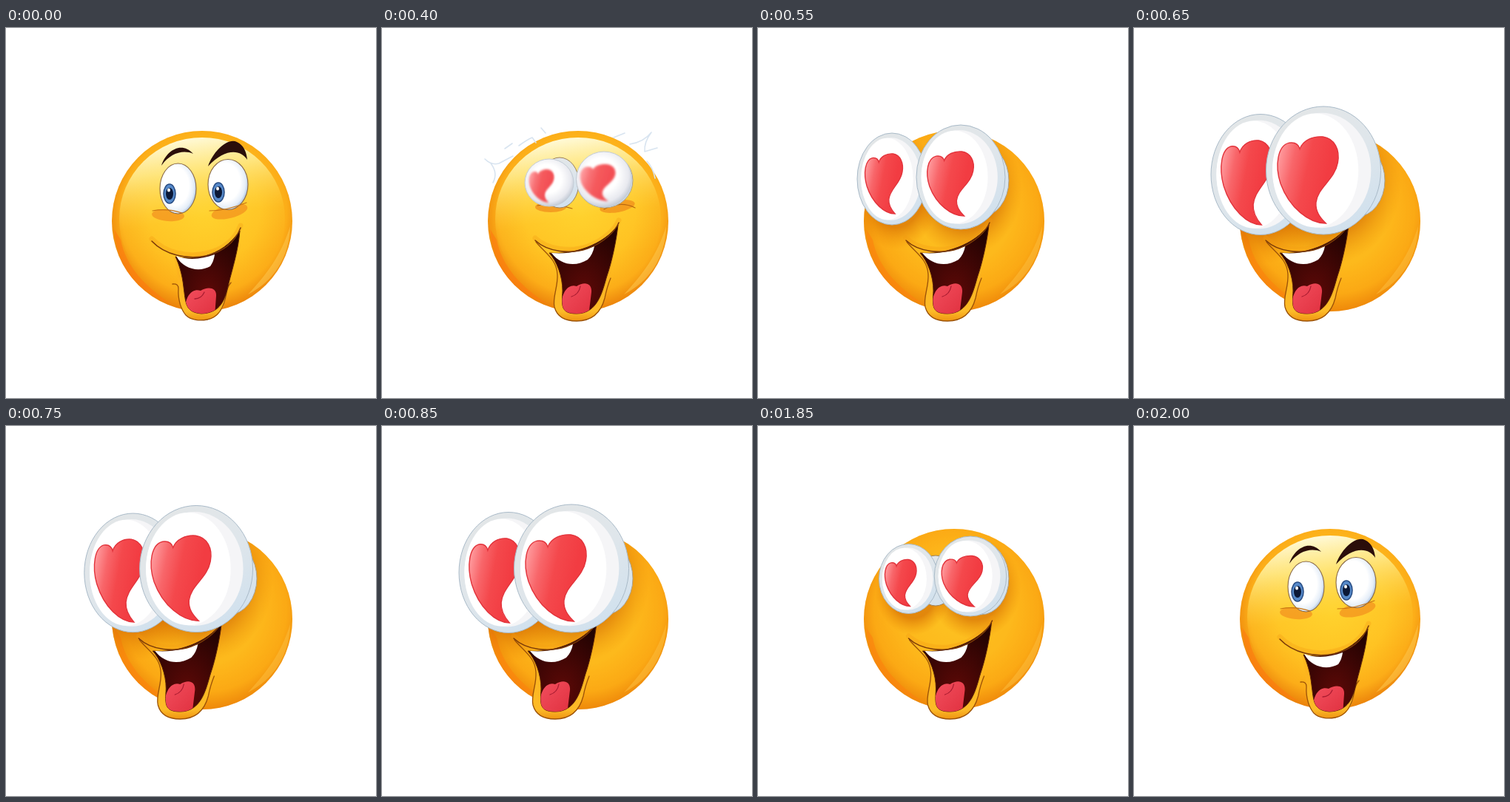
Animation, 500 px wide and 500 px high, one loop 2.2 s. Source, as an HTML page:

```html
<!DOCTYPE html>
<html lang="en">
<head>
<meta charset="utf-8">
<title>Heart eyes</title>
<style>
  html, body { margin: 0; width: 100%; height: 100%; overflow: hidden; background: #fff; }
  svg { display: block; width: 100vw; height: 100vh; }
  .line { fill: none; stroke-linecap: round; stroke-linejoin: round; }
</style>
</head>
<body>
<svg viewBox="0 0 500 500">
  <defs>
    <radialGradient id="skin" gradientUnits="userSpaceOnUse" cx="268" cy="248" r="136">
      <stop offset="0" stop-color="#ffd02a"/><stop offset=".55" stop-color="#ffc222"/>
      <stop offset=".82" stop-color="#fcad18"/><stop offset="1" stop-color="#ea800a"/>
    </radialGradient>
    <linearGradient id="shine" x1=".4" y1="0" x2=".55" y2="1">
      <stop offset="0" stop-color="#fffbdc"/><stop offset=".2" stop-color="#ffec8c" stop-opacity=".85"/>
      <stop offset=".5" stop-color="#ffda3c" stop-opacity=".2"/><stop offset=".75" stop-color="#ffd030" stop-opacity="0"/>
    </linearGradient>
    <linearGradient id="chin" x1="0" y1="0" x2="0" y2="1">
      <stop offset="0" stop-color="#fdb41e" stop-opacity="0"/><stop offset=".45" stop-color="#fdb41e"/>
      <stop offset=".88" stop-color="#fdbb28"/><stop offset="1" stop-color="#ee9412"/>
    </linearGradient>
    <radialGradient id="shadow">
      <stop offset=".62" stop-color="#d06400" stop-opacity=".6"/><stop offset="1" stop-color="#e88000" stop-opacity="0"/>
    </radialGradient>
    <radialGradient id="white" cx=".42" cy=".45" r=".58">
      <stop offset=".65" stop-color="#fff"/><stop offset=".9" stop-color="#e4edf8"/><stop offset="1" stop-color="#b4c9e4"/>
    </radialGradient>
    <radialGradient id="ball" cx=".45" cy=".42" r=".6">
      <stop offset=".5" stop-color="#fff"/><stop offset=".82" stop-color="#e8e9ef"/><stop offset="1" stop-color="#bfc7d2"/>
    </radialGradient>
    <linearGradient id="rim" x1=".2" y1="0" x2=".8" y2="1">
      <stop offset="0" stop-color="#e3e6e7"/><stop offset=".5" stop-color="#dfe6eb"/><stop offset="1" stop-color="#cfe0ee"/>
    </linearGradient>
    <linearGradient id="heart" x1="0" y1=".25" x2=".8" y2=".5">
      <stop offset="0" stop-color="#ff9da0"/><stop offset=".3" stop-color="#f8666a"/>
      <stop offset=".6" stop-color="#f4484c"/><stop offset="1" stop-color="#f23c42"/>
    </linearGradient>
    <radialGradient id="mouth" cx=".5" cy=".75" r=".75">
      <stop offset="0" stop-color="#5c0907"/><stop offset="1" stop-color="#240302"/>
    </radialGradient>
    <linearGradient id="tongue" x1="0" y1="0" x2="1" y2="1">
      <stop offset="0" stop-color="#f24f5e"/><stop offset="1" stop-color="#e0303f"/>
    </linearGradient>
    <filter id="soft"><feGaussianBlur stdDeviation=".03"/></filter>
    <clipPath id="faceClip"><circle cx="265" cy="261" r="122"/></clipPath>
  </defs>
  <circle cx="265" cy="261" r="122" fill="url(#skin)"/>
  <path d="M146 272C150 322 177 358 224 373C188 350 162 322 155 286Z" fill="#ff7a10" opacity=".6"/>
  <path d="M384 268C383 310 362 342 327 360C352 333 371 309 384 268Z" fill="#ffce55" opacity=".5"/>
  <g id="poses"></g>
</svg>
<script>
const ellipse = (x, y, rx, ry, fill, extra = '') =>
  `<ellipse cx="${x}" cy="${y}" rx="${rx}" ry="${ry}" fill="${fill}" ${extra}/>`;
const shape = (d, fill, extra = '') => `<path d="${d}" fill="${fill}" ${extra}/>`;
const line = (d, color, width, extra = '') =>
  `<path class="line" d="${d}" stroke="${color}" stroke-width="${width}" ${extra}/>`;

const HEART = 'M.37 .14C.42 .04 .58 -.01 .74 0C.93 .02 1.02 .15 .98 .3C.93 .5 .66 .58 .63 .76' +
  'C.62 .86 .69 .93 .79 1C.52 1 .2 .82 .06 .54C-.04 .32 .02 .1 .2 .07C.3 .06 .35 .09 .37 .14Z';

const MOUTHS = {
  grin: {
    chin: 'M226 310C236 335 229 365 240 384C247 394 258 395 268 395C285 394 293 382 297 366C301 345 311 320 314 290Z',
    jaw: 'M225 346Q233 345 233 352C232 368 237 381 243 388C250 395 262 396 272 394C288 391 295 376 298 358Q299 350 304 344',
    hole: 'M229 309C250 314 290 312 316 274C314 300 306 325 301 345C296 368 290 385 264 386C242 384 243 372 240 350C238 332 234 320 229 309Z',
    teeth: 'M230 308C248 315 265 312 282 306Q281 315 276 322C262 330 240 327 230 308Z',
    lip: 'M197 288C215 307 245 313 270 308C295 302 310 288 317 270',
    tongue: 'M242 384C241 362 252 351 263 355C272 349 285 350 284 362L282 390H246Z',
    fold: 'M255 366Q264 366 268 357'
  },
  laugh: {
    chin: 'M224 304C236 312 239 325 237 337C238 350 230 364 233 377C237 392 250 396 263 396C285 396 296 384 301 365C306 342 314 312 316 285Z',
    jaw: 'M208 289C220 304 236 312 237 333C238 350 230 364 233 377C237 392 250 396 263 396C285 396 296 384 301 365Q304 350 309 338',
    hole: 'M226 304C258 307 300 293 319 266C317 285 311 315 304 335C298 355 292 386 263 386C241 386 243 375 244 355C244 335 236 315 226 304Z',
    teeth: 'M229 304C252 306 270 301 287 295Q285 306 278 313C262 323 242 321 229 304Z',
    lip: 'M207 287C224 303 255 306 278 298C300 290 315 275 320 263',
    tongue: 'M242 382C241 357 252 345 263 349C274 342 284 345 283 357L279 390H246Z',
    fold: 'M256 363Q266 360 268 349'
  }
};

function mouth(name, dx, id) {
  const m = MOUTHS[name];
  return `<g transform="translate(${dx})">
    <clipPath id="${id}"><path d="${m.hole}"/></clipPath>
    ${shape(m.chin, 'url(#chin)')}
    ${line(m.lip, '#f09a12', 7, 'opacity=".3" transform="translate(0 -3)"')}
    ${line(m.jaw, '#9c5208', 1.3)}
    ${shape(m.hole, 'url(#mouth)', 'stroke="#5b2506"')}
    <g clip-path="url(#${id})">${shape(m.tongue, 'url(#tongue)')}${line(m.fold, '#a91c31', 1.3)}</g>
    ${shape(m.teeth, '#fff')}
    ${line(m.lip, '#7a3a08', 1.5)}
  </g>`;
}

function restingPose() {
  const eye = (x, y, rx, ry, ix, iy) =>
    ellipse(x, y, rx, ry, 'url(#white)', 'stroke="#8a6a48" stroke-width="1.1"') +
    ellipse(ix, iy, 8, 13, '#5689c9', 'stroke="#274b82" stroke-width="1.5"') +
    ellipse(ix, iy, 5, 8, '#0b1836') + ellipse(ix - 1, iy - 5, 2, 2.5, '#fff');
  return ellipse(265, 258, 112, 110, 'url(#shine)') +
    ellipse(219, 253, 22, 8, '#f18a1c', 'opacity=".65" transform="rotate(4 219 253)"') +
    ellipse(302, 248, 25, 9, '#f18a1c', 'opacity=".65" transform="rotate(-14 302 248)"') +
    eye(232.5, 217, 24.5, 34, 221, 224) + eye(300, 211.5, 27, 34, 287, 222) +
    line('M198 247Q217 243 238 250M275 247Q298 247 325 236', '#c87412', 1.2) +
    shape('M210 186C216 166 237 152 253 170C239 164 222 169 210 186Z', '#2b0e0a') +
    shape('M273 187C280 166 300 148 312 154C321 158 325 167 326 178C317 164 296 162 273 187Z', '#2b0e0a') +
    mouth('grin', 0, 'grinHole');
}

// Eye values: centre, radii, then the heart's left, top, width and height.
const POP = { dx: 0, eyes: [[226, 209, 33, 32, 198, 191, 35, 45], [300, 204.5, 37.5, 37.5, 267, 184, 49, 50]] };
const BULGE = { dx: -7, eyes: [[181, 204, 47, 62, 144, 170, 52, 81], [274, 201.5, 60, 70.5, 228, 167, 64, 87]] };
const FULL = { dx: -29, eyes: [[171, 198, 67, 81.5, 117, 152, 70, 114], [256, 192.5, 77.5, 86.5, 193, 147, 84, 117]] };

const mix = (a, b, k) => a + (b - a) * k;
const blend = (a, b, k) => ({
  dx: mix(a.dx, b.dx, k),
  eyes: a.eyes.map((eye, i) => eye.map((v, j) => mix(v, b.eyes[i][j], k)))
});

function heartEye([x, y, rx, ry, hx, hy, hw, hh], small) {
  const body = small
    ? ellipse(x, y, rx, ry, 'url(#ball)', 'stroke="#c3ccd6"')
    : ellipse(x, y, rx, ry, 'url(#rim)', 'stroke="#a9bac8"') +
      ellipse(x - rx * .03, y, rx * .86, ry * .9, '#f5f5f7') +
      ellipse(x - rx * .14, y, rx * .75, ry * .89, '#fff');
  return body + `<g transform="translate(${hx} ${hy}) scale(${hw} ${hh})" ${small ? 'filter="url(#soft)" opacity=".9"' : ''}>
    ${shape(HEART, 'url(#heart)', small ? '' : 'stroke="#e2333b" stroke-width="1.4" vector-effect="non-scaling-stroke"')}</g>`;
}

function heartPose(pose, id, small = false) {
  const shadows = pose.eyes.map(([x, y, rx, ry]) => ellipse(x + 6, y + 16, rx * 1.28, ry * 1.28, 'url(#shadow)')).join('');
  const light = small
    ? ellipse(265, 258, 112, 110, 'url(#shine)') +
      ellipse(228, 242, 21, 7, '#ee8418', 'opacity=".65"') +
      ellipse(318, 241, 24, 8, '#ee8418', 'opacity=".65" transform="rotate(-10 318 241)"') +
      line('M210 240Q230 236 257 244M300 245Q322 233 342 243', '#b9680e', 1.2)
    : `<circle cx="265" cy="261" r="122" fill="#f59b0a" opacity=".25"/>
       <g clip-path="url(#faceClip)">${shadows}</g>`;
  const sparks = small ? line(
    'M139 177Q148 186 158 183L177 173M147 183Q157 196 150 209M166 163L176 156M185 159Q196 151 203 148L208 155' +
    'M215 135L221 142M313 148L328 142M335 157Q354 154 364 141Q354 154 355 167L372 162M358 180Q366 188 369 203',
    '#d8e4f0', 1.6) : '';
  return light + sparks + mouth('laugh', pose.dx, id) +
    ellipse(240, 209, 26, 34, 'url(#rim)', 'stroke="#9b815e"') +
    ellipse(301, 206, 38, small ? 37 : 49, 'url(#rim)', 'stroke="#a9a08c"') +
    pose.eyes.map(eye => heartEye(eye, small)).join('');
}

const drawings = {
  rest: restingPose(),
  pop: heartPose(POP, 'popHole', true),
  grow: heartPose(blend(POP, BULGE, .5), 'growHole'),
  bulge: heartPose(BULGE, 'bulgeHole'),
  full: heartPose(FULL, 'fullHole'),
  recoil: heartPose(blend(BULGE, FULL, .94), 'recoilHole')
};
const LOOP = 2200;
const timeline = [
  [0, 'rest'], [400, 'pop'], [450, 'grow'], [550, 'bulge'], [650, 'full'], [750, 'recoil'],
  [850, 'full'], [1750, 'bulge'], [1850, 'grow'], [1950, 'pop'], [2000, 'rest']
];

const stage = document.getElementById('poses');
let shown = '';
function show(time) {
  const name = timeline.findLast(([start]) => start <= time)[1];
  if (name !== shown) stage.innerHTML = drawings[shown = name];
}

const began = performance.now();
function tick() {
  show((performance.now() - began) % LOOP);
  requestAnimationFrame(tick);
}
tick();
</script>
</body>
</html>
```
